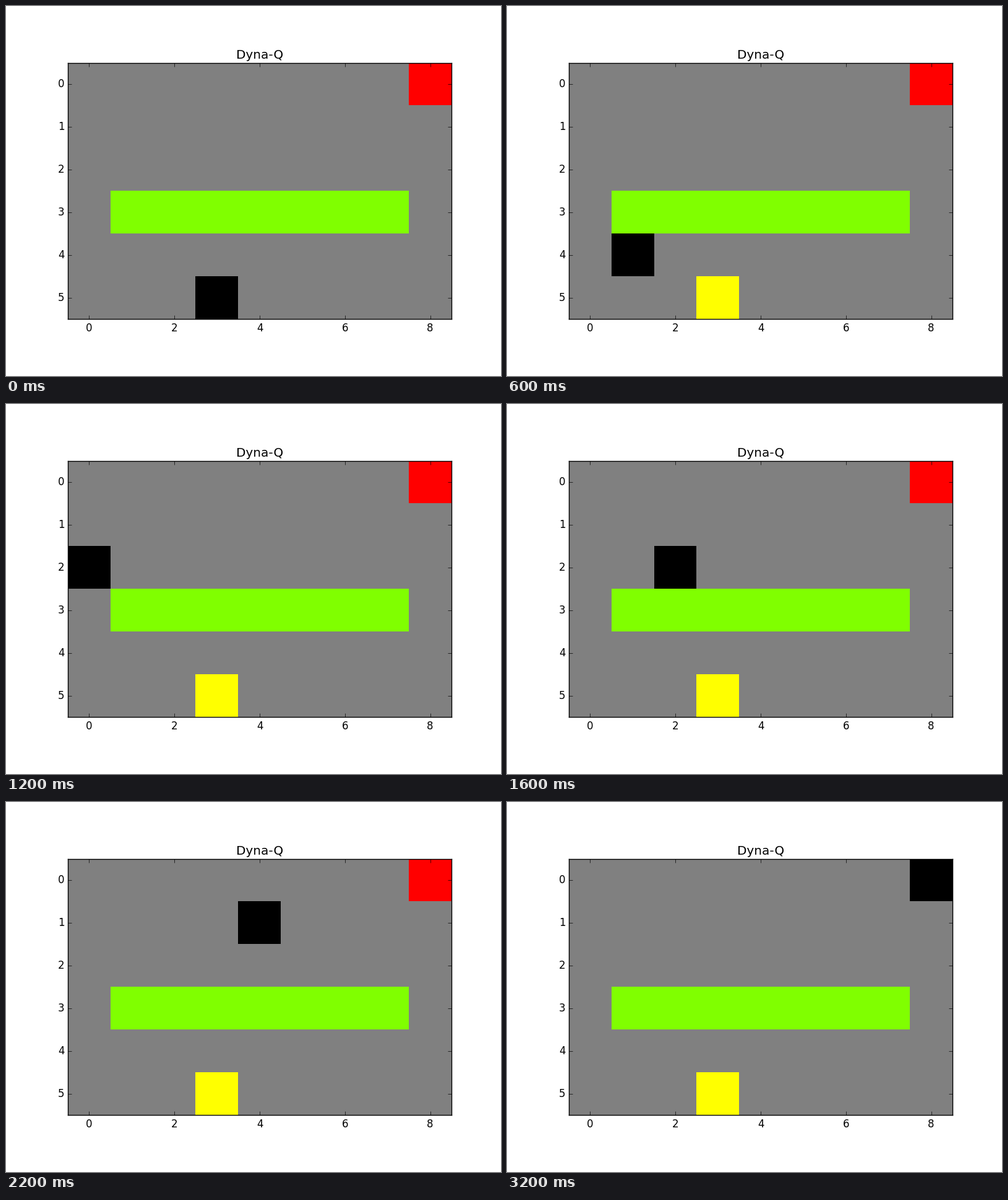
A matplotlib script for the animation above (3.4 s loop, 800x597 px).

```python
import numpy as np
import matplotlib.pyplot as plt
from matplotlib.animation import FuncAnimation

plt.style.use("classic")
plt.rcParams.update({
    "font.family": "DejaVu Sans",
    "figure.facecolor": "white",
    "savefig.facecolor": "white",
})

ROWS, COLS = 6, 9
STEP_MS = 200

GRAY = (128, 128, 128)
GREEN = (128, 255, 0)
YELLOW = (255, 255, 0)
RED = (255, 0, 0)
BLACK = (0, 0, 0)

START, GOAL = (5, 3), (0, 8)
MOVES = {"U": (-1, 0), "L": (0, -1), "R": (0, 1)}
ROUTE = "ULLLUURRRURURRRR"


def walk(start, route):
    """Cells visited from start, one per move."""
    cells = [start]
    for move in route:
        (row, col), (d_row, d_col) = cells[-1], MOVES[move]
        cells.append((row + d_row, col + d_col))
    return cells


def make_maze():
    maze = np.full((ROWS, COLS, 3), GRAY, dtype=np.uint8)
    maze[3, 1:8] = GREEN
    maze[START] = YELLOW
    maze[GOAL] = RED
    return maze


PATH = walk(START, ROUTE)
MAZE = make_maze()

fig = plt.figure(figsize=(8, 5.97), dpi=100)
ax = fig.add_axes([0.125, 0.1, 0.775, 0.8])
image = ax.imshow(MAZE, interpolation="nearest")
ax.set_xlim(-0.5, COLS - 0.5)
ax.set_ylim(ROWS - 0.5, -0.5)
ax.set_xticks(range(0, COLS, 2))
ax.set_yticks(range(ROWS))
ax.set_title("Dyna-Q")


def draw(step):
    grid = MAZE.copy()
    grid[PATH[step]] = BLACK
    image.set_data(grid)
    return [image]


anim = FuncAnimation(fig, draw, frames=len(PATH), interval=STEP_MS,
                     repeat=True, repeat_delay=0)
plt.show()
```
